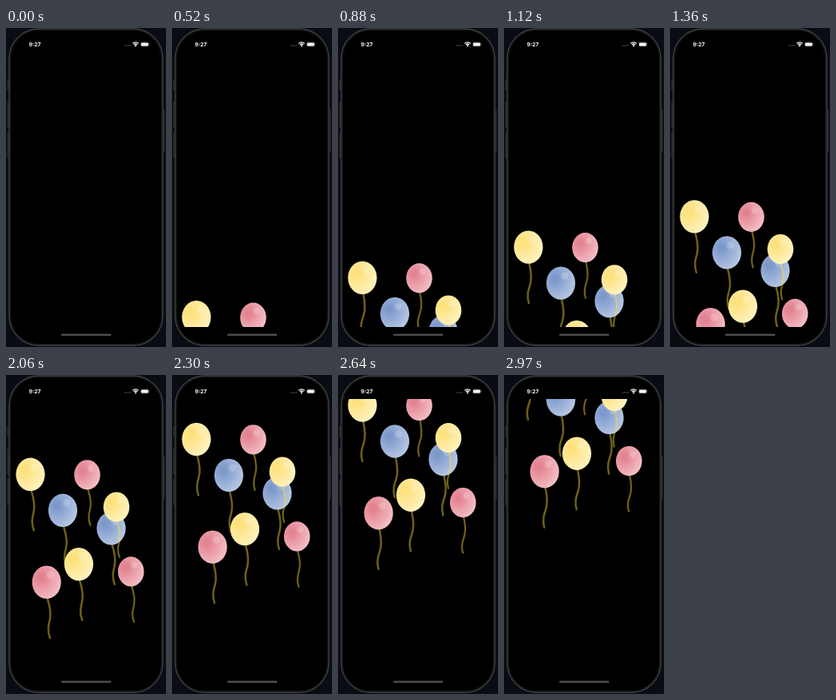
An HTML page that plays this animation: 200x399 px, repeating every 3 s.

```html
<!DOCTYPE html>
<html lang="en">
<head>
<meta charset="utf-8">
<title>Balloons</title>
<style>
html, body { margin: 0; width: 100%; height: 100%; overflow: hidden; background: #0a0c13; }
svg { display: block; width: 200px; height: 399px; }
.time { font: 700 6.8px Inter, "Liberation Sans", sans-serif; fill: #fff; }
</style>
</head>
<body>
<svg viewBox="0 0 200 399">
  <defs>
    <clipPath id="sky"><rect x="7" y="30" width="186" height="344"/></clipPath>
  </defs>
  <path d="M2.5 64v14M2.5 92v33M2.5 130v33M197.5 102v53" stroke="#26272b" stroke-width="2"/>
  <rect x="4" y="1" width="192" height="396" rx="37" fill="#000" stroke="#404142" stroke-width="1.4"/>
  <rect x="5.6" y="2.6" width="188.8" height="392.8" rx="35.5" fill="none" stroke="#1a1a1b"/>
  <text class="time" x="28.6" y="22.9">9:27</text>
  <path d="M148 22h8" stroke="#666" stroke-dasharray="1.4 .8"/>
  <g fill="none" stroke="#fff" stroke-width="1.3">
    <path d="M158.2 19.4a5.4 5.4 0 0 1 7.6 0M159.8 21a3.2 3.2 0 0 1 4.4 0"/>
    <circle cx="162" cy="22.4" r=".4"/>
  </g>
  <rect x="168.4" y="17.8" width="10" height="5.2" rx="1.5" fill="none" stroke="#666" stroke-width=".6"/>
  <rect x="169" y="18.4" width="8.8" height="4" rx="1" fill="#fff"/>
  <path d="M179.3 19.5v1.8" stroke="#666" stroke-width=".7"/>
  <g id="balloons" clip-path="url(#sky)"></g>
  <rect x="69" y="382.6" width="62.5" height="2.4" rx="1.2" fill="#4c4c4d"/>
</svg>
<script>
const LOOP = 3000, SWAY = 2000;
const colors = {
  yellow: ['#fde17c', '#fff4c8'],
  pink: ['#e38290', '#f5c6cc'],
  blue: ['#7c98cb', '#becde6']
};
// x, height below the lead balloon, scale, color
const balloons = [
  [30.5, 0, 1, 'yellow'],
  [101.5, .5, .9, 'pink'],
  [71, 45, 1, 'blue'],
  [131.5, 67.5, 1, 'blue'],
  [138, 40.7, .9, 'yellow'],
  [50.7, 134.8, 1, 'pink'],
  [91, 112.3, 1, 'yellow'],
  [156.2, 121.6, .9, 'pink']
];
// time, height of the lead balloon
const rise = [
  [0, 398], [210, 394], [400, 377], [730, 335], [880, 312.5], [1360, 236], [1700, 181], [1820, 159.5],
  [2060, 124.5], [2300, 80.4], [2360, 76], [2910, 1.5], [LOOP, -21.5]
];

const gradient = ([name, [inner, outer]]) => `<radialGradient id="${name}" cx=".3" cy=".35" r=".8">
  <stop offset=".1" stop-color="${inner}"/><stop offset="1" stop-color="${outer}"/></radialGradient>`;

const balloon = ([, , , color]) => `<g>
  <path d="M1 20C4 31 5 40 3 47S-1 61 2.2 70" fill="none" stroke="#ffe030" stroke-opacity=".43"
    stroke-width="2.5" stroke-linecap="round"/>
  <ellipse rx="18.1" ry="20.7" fill="url(#${color})"/>
  <circle cx="4.7" cy="-9" r="4.6" fill="#fff" fill-opacity=".2"/></g>`;

const layer = document.getElementById('balloons');
layer.innerHTML = Object.entries(colors).map(gradient).join('') + balloons.map(balloon).join('');
const groups = [...layer.querySelectorAll('g')];

function heightAt(t) {
  const i = rise.findIndex(([end]) => end > t);
  const [t0, y0] = rise[i - 1], [t1, y1] = rise[i];
  return y0 + (y1 - y0) * (t - t0) / (t1 - t0);
}

function draw(now) {
  const t = now % LOOP, y = heightAt(t);
  const angle = -3.2 * Math.cos(2 * Math.PI * (t - 1830) / SWAY);
  groups.forEach((g, i) => {
    const [x, dy, scale] = balloons[i];
    g.setAttribute('transform', `translate(${x} ${y + dy}) scale(${scale})`);
    g.firstElementChild.setAttribute('transform', `rotate(${angle} 1 20)`);
  });
  requestAnimationFrame(() => draw(performance.now() - start));
}
const start = performance.now();
draw(0);
</script>
</body>
</html>
```
